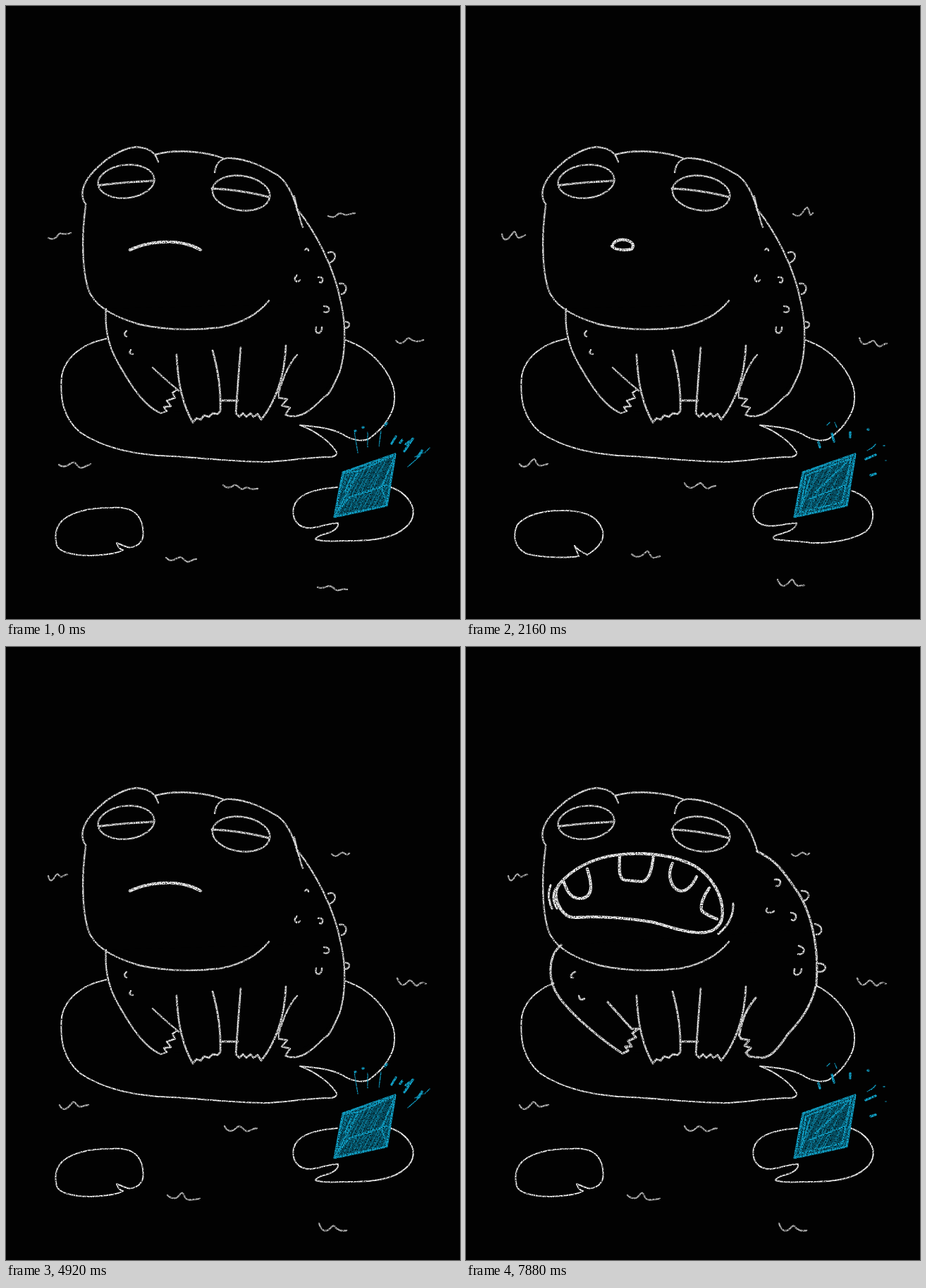
An HTML page that plays this animation: 644x870 px, repeating every 8000 ms.

```html
<!DOCTYPE html>
<html lang="en">
<head>
<meta charset="utf-8">
<title>Frog on a lily pad</title>
<style>
  html, body { margin: 0; width: 100%; height: 100%; overflow: hidden; background: #020202; }
  svg { display: block; width: 100vw; height: 100vh; }
  path, ellipse { fill: none; stroke-linecap: round; stroke-linejoin: round; }
  .chalk { filter: url(#chalk); stroke: #dcdcdc; stroke-width: 2.4; }
  .mask { fill: #020202; stroke: none; }
  .thin { stroke-width: 2; stroke: #f0f0f0; }
  .heavy { stroke-width: 3.2; }
  .bold { stroke-width: 4.2; stroke: #f0f0f0; }
  .wave { stroke: #b8b8b8; stroke-width: 2.3; }
  .blue { stroke: #10a3ca; }
  .base { fill: #075469; stroke: none; }
  .hatch { stroke: #0b7f9f; stroke-width: 1.5; }
  .spark { stroke-width: 3.4; }
  .faint { stroke-width: 1.3; }
</style>
</head>
<body>
<svg viewBox="0 0 644 870">
  <defs>
    <filter id="chalk" filterUnits="userSpaceOnUse" x="0" y="0" width="644" height="870" color-interpolation-filters="sRGB">
      <feTurbulence type="fractalNoise" baseFrequency=".6" numOctaves="2" seed="4" result="noise"/>
      <feDisplacementMap in="SourceGraphic" in2="noise" scale="1.2" xChannelSelector="R" yChannelSelector="G" result="rough"/>
      <feColorMatrix in="noise" values="0 0 0 0 1  0 0 0 0 1  0 0 0 0 1  0 0 0 3 -.6" result="grain"/>
      <feComposite in="rough" in2="grain" operator="in"/>
    </filter>
    <clipPath id="gemShape"><path d="M478,662 L552,636 540,709 466,725Z"/></clipPath>
  </defs>

  <g class="chalk thin">
    <path d="M160,470 C105,474 83,503 79,525 C76,560 82,585 105,605 C135,625 170,634 215,638 C270,640 320,647 372,647 C405,645 430,640 462,640 Q470,638 469,633 C460,619 440,603 417,595 C435,597 460,598 478,608 C490,616 505,619 515,614 C535,600 552,578 551,555 C553,535 530,490 481,474 L465,468"/>
  </g>

  <g class="pads chalk thin">
    <path d="M157,762 C158,768 163,772 166,772 C160,777 140,779 120,780 C95,780 75,775 72,765 C68,750 72,738 80,730 C95,717 120,712 150,712 C175,710 188,718 193,735 C196,752 195,757 188,764 C180,769 176,769 172,768 L157,762"/>
    <path d="M470,683 C440,685 412,692 408,712 C405,730 415,741 432,741 C450,739 460,733 471,734 C472,742 462,747 450,750 Q440,753 439,757 C450,761 465,759 480,759 C510,759 535,758 555,748 C575,737 580,725 577,712 C572,698 560,688 546,683"/>
  </g>
  <g class="pads chalk thin">
    <path d="M154,766 L160,781 C145,783 110,784 85,777 C68,768 66,750 73,736 C85,722 110,716 135,716 C165,716 185,722 193,742 C198,756 190,768 172,779 Q158,772 154,766"/>
    <path d="M470,683 C440,685 412,692 408,712 C405,728 415,738 432,738 C450,737 460,733 469,734 C468,743 455,747 440,751 Q433,754 438,757 C455,759 475,760 490,762 C520,763 550,757 567,746 C580,735 580,715 570,702 Q560,692 547,688"/>
  </g>

  <path class="mask" d="M478,662 L552,636 540,709 466,725Z"/>
  <g class="gem chalk blue">
    <path class="base" d="M478,662 L552,636 540,709 466,725Z"/>
    <path class="hatch" clip-path="url(#gemShape)"/>
    <path stroke-width="3.2" d="M478,662 L552,636 540,709 466,725Z"/>
    <path d="M478,663 L500,660 552,637 533,683 487,697 466,724 500,661 M533,683 L540,707 M487,697 L540,680 M480,690 L492,664"/>
    <path class="faint" d="M494,603 L499,634 M513,605 V626 M532,603 L529,625 M570,654 L588,638 M580,640 L592,634 M594,634 L601,627"/>
    <path class="spark" d="M506,598 h1 M540,592 l-2,3 M495,603 h1 M547,621 L553,611 M559,620 L562,616 M565,632 L577,614 M567,622 l5,-4 M584,640 L590,631"/>
  </g>
  <g class="gem chalk blue">
    <path class="base" d="M478,662 L552,636 540,709 466,725Z"/>
    <path class="hatch" clip-path="url(#gemShape)"/>
    <path stroke-width="3.2" d="M478,662 L552,636 540,709 466,725Z"/>
    <path d="M482,666 L546,642 534,704 474,719Z M486,700 L538,680 M496,690 L546,642 M474,719 L488,668"/>
    <path class="spark" d="M500,619 L502,626 M519,607 L522,618 M545,605 V612 M570,601 h1 M567,643 L581,637 M574,666 L581,664"/>
    <path class="faint" d="M512,595 L516,591 M523,591 L526,598 M569,631 L579,625 M575,628 L581,622 M592,624 h2 M595,645 h1"/>
  </g>

  <g class="body">
    <path class="mask" d="M142,430 L143,475 160,507 200,560 222,575 402,578 440,560 473,520 481,474 475,420Z"/>
    <g class="chalk">
      <path d="M142,430 C140,455 144,480 158,505 C175,535 195,568 220,578 L228,575 224,569 234,568 228,560 240,556 236,549 242,545"/>
      <path d="M409,270 Q415,298 421,314 M413,288 C440,322 465,370 475,420 C484,460 480,500 473,520 C462,545 457,553 452,554 C430,577 418,584 402,582 L396,580 403,570 391,567 399,558 387,556 386,548"/>
      <path d="M208,513 Q220,525 245,546 M413,495 Q398,511 387,548"/>
      <path d="M457,350 C469,346 470,360 460,364 M473,394 C486,392 484,408 476,409 M482,448 C489,448 488,456 482,457 M424,346 q4,-4 5,1 M413,382 q-6,5 -1,9 q4,0 5,-2 M443,385 q7,-1 6,5 q-1,4 -4,2 M451,426 q8,0 7,6 q-1,4 -7,2 M440,456 q-2,9 4,8 q4,-1 4,-8 M171,461 q-6,5 0,8 M177,488 q-4,6 3,6"/>
    </g>
  </g>
  <g class="body">
    <path class="mask" d="M135,423 L119,460 130,490 170,535 222,575 402,578 424,580 456,550 490,505 497,475 490,400Z"/>
    <g class="chalk heavy">
      <path d="M135,423 C117,437 114,472 132,497 C150,522 190,556 222,577 L230,573 226,567 235,567 230,559 241,554 236,548 243,543"/>
      <path d="M413,290 C440,303 450,318 465,340 C490,372 501,425 497,478 C490,510 475,530 456,550 C440,575 430,582 420,583 L402,581 397,576 404,569 395,566 402,558 390,556 387,550"/>
      <path d="M201,504 L235,542 H245 M411,498 Q392,520 388,549"/>
      <path stroke-width="2.6" d="M476,346 C490,345 488,360 478,360 M495,393 C508,395 506,409 497,408 M500,449 C514,449 512,462 500,461 M438,330 q8,-1 8,4 q-1,6 -6,5 M427,371 q-3,6 4,6 q4,0 6,-2 M461,377 q8,1 7,7 q-2,6 -6,3 M472,424 q9,3 7,8 q-2,5 -8,4 M466,457 q-2,10 4,8 q5,-1 6,-8 M155,461 q-7,3 -6,8 h3 M160,495 q1,8 8,4"/>
    </g>
  </g>

  <g class="chalk">
    <path stroke-width="2.8" d="M242,495 C244,535 250,565 265,591 L270,585 276,587 281,581 288,583 293,578 300,579 304,575 C305,545 302,520 293,489 M304,560 H329 M333,485 C330,520 328,550 326,578 L331,583 336,578 341,583 347,578 351,583 357,579 362,587 C380,565 395,530 397,482"/>
    <path d="M113,282 C107,330 108,370 116,400 C125,430 165,445 190,452 C230,461 270,460 305,456 C335,450 358,437 373,418"/>
    <path d="M113,281 C105,270 108,255 118,242 C140,215 165,202 185,200 C203,201 212,208 216,221 M211,211 C240,202 285,207 308,216 M296,236 C298,222 305,215 320,216 C345,218 365,228 385,240 C400,250 410,275 413,290"/>
    <ellipse cx="170.5" cy="249" rx="40" ry="23.5" transform="rotate(-6 170.5 249)"/>
    <ellipse cx="333.5" cy="265.5" rx="41" ry="24.5" transform="rotate(8 333.5 265.5)"/>
    <path stroke-width="3" d="M131,254.5 Q165,250 210,248 M292,259 C320,260 345,264 373,271"/>
  </g>

  <g class="mouth chalk bold"><path d="M176,346 C195,337 240,326 276,346"/></g>
  <g class="mouth chalk bold"><path d="M207,341 C210,333 218,331 226,332 C237,334 239,340 235,345 C228,347 212,347 207,341Z"/></g>
  <g class="mouth chalk bold">
    <path d="M147,351 C142,335 160,316 195,314 C230,311 262,316 280,329 C292,338 300,352 298,366 C296,374 280,374 262,371 C235,368 215,374 190,374 C165,374 150,365 147,351Z"/>
    <path stroke-width="3.4" d="M162,326 Q164,333 175,332 Q191,333 193,316 M208,316 Q209,325 220,325 Q235,327 237,316 M253,320 Q251,331 261,332 Q269,331 272,326 M283,333 Q272,338 277,345 Q280,351 289,352"/>
  </g>
  <g class="mouth chalk bold">
    <path d="M143,381 C128,369 123,350 132,337 C150,315 180,299 215,295 C255,290 295,295 325,311 C348,325 368,355 363,386 C358,402 345,407 325,405 C300,403 285,395 262,390 C230,385 205,383 178,383 C160,383 150,386 143,381Z"/>
    <path d="M138,332 C143,345 147,357 162,357 C181,356 179,337 172,315 M218,297 C217,318 217,330 226,331 L250,333 C261,331 264,312 266,296 M293,307 C285,322 290,342 303,346 C313,348 322,337 327,326 M345,342 C337,353 331,368 335,375 Q344,382 356,386"/>
    <path stroke-width="3" d="M120,338 Q114,354 122,371 M127,343 Q120,356 129,371 M379,364 Q380,389 358,407"/>
  </g>

  <g class="wave chalk"><path d="M60,329 C66,332 70,331 74,325 S80,327 92,322 M457,298 C463,300 465,301 469,297 S475,294 480,296 S488,294 495,294 M553,475 C558,480 562,480 567,474 S574,474 578,475 S584,477 592,474 M75,651 C81,656 87,653 92,649 S99,650 103,654 S112,653 120,650 M308,680 C313,685 318,684 322,681 S329,682 333,685 S339,681 344,684 S351,685 357,685 M227,783 C233,789 237,787 242,784 S249,782 254,787 S263,785 270,785 M442,825 C448,827 451,826 455,824 S463,824 467,828 S476,826 484,828"/></g>
  <g class="wave chalk"><path d="M60,325 C62,335 66,332 70,325 S74,326 78,326 S82,323 87,323 M462,294 C466,298 469,298 473,294 S479,292 482,294 S485,293 487,293 M555,470 C559,481 564,482 570,475 S579,484 584,480 S590,475 596,478 M76,650 C80,659 86,657 92,649 S99,650 103,652 S110,650 117,650 M310,680 C314,688 320,689 326,683 S334,682 339,686 S347,683 356,683 M229,778 C235,784 241,784 246,778 S251,775 254,781 S265,784 275,783 M444,818 C447,828 453,832 460,825 S465,823 470,826 S477,829 483,828"/></g>
  <g class="wave chalk"><path d="M51,324 C53,335 59,333 65,324 S70,325 73,328 S79,327 84,325 M464,295 C469,300 474,299 479,291 S485,285 487,293 S490,294 492,294 M558,471 C561,481 566,482 573,477 S580,478 584,482 S592,479 597,479 M76,650 C80,656 86,655 92,647 S98,645 101,650 S110,651 116,650 M310,677 C314,685 320,686 327,680 S334,678 339,683 S347,681 354,681 M235,778 C240,783 247,783 253,777 S258,774 262,780 S269,782 275,781 M442,814 C446,824 451,826 458,818 S463,815 467,820 S474,822 480,822"/></g>
</svg>
<script>
const LOOP = 8000, FRAME = 40;
// One mouth pose per beat: 0 closed, 1 small, 2 open, 3 wide.
const MOUTHS = "01232123210123210012321000123210122321223";

const layers = {};
for (const name of ["wave", "pads", "gem", "body", "mouth"])
  layers[name] = [...document.querySelectorAll("." + name)];

function show(name, pose) {
  layers[name].forEach((el, i) => { el.style.display = i === pose ? "" : "none"; });
}

document.querySelectorAll(".hatch").forEach((el, pose) => {
  let d = "";
  for (let i = 0; i < 34; i++) {
    const x = 430 + i * 4 + 2 * Math.sin(i * 2.3 + pose);
    d += `M${x},728 L${x + 48 + 6 * Math.sin(i * 1.7)},632 `;
  }
  el.setAttribute("d", d);
});

function draw(now) {
  const t = Math.floor(now % LOOP / FRAME) * FRAME;
  const beat = Math.floor((t + 26) / 196.6);
  const mouth = +MOUTHS[beat];
  show("wave", beat % 3);
  show("pads", Math.floor((t + 150) / 393.2) % 2);
  show("gem", Math.floor((t + 2) / 236) % 2);
  show("mouth", mouth);
  show("body", mouth > 1 ? 1 : 0);
}

let start;
function tick(now) {
  start ??= now;
  draw(now - start);
  requestAnimationFrame(tick);
}
draw(0);
requestAnimationFrame(tick);
</script>
</body>
</html>
```
